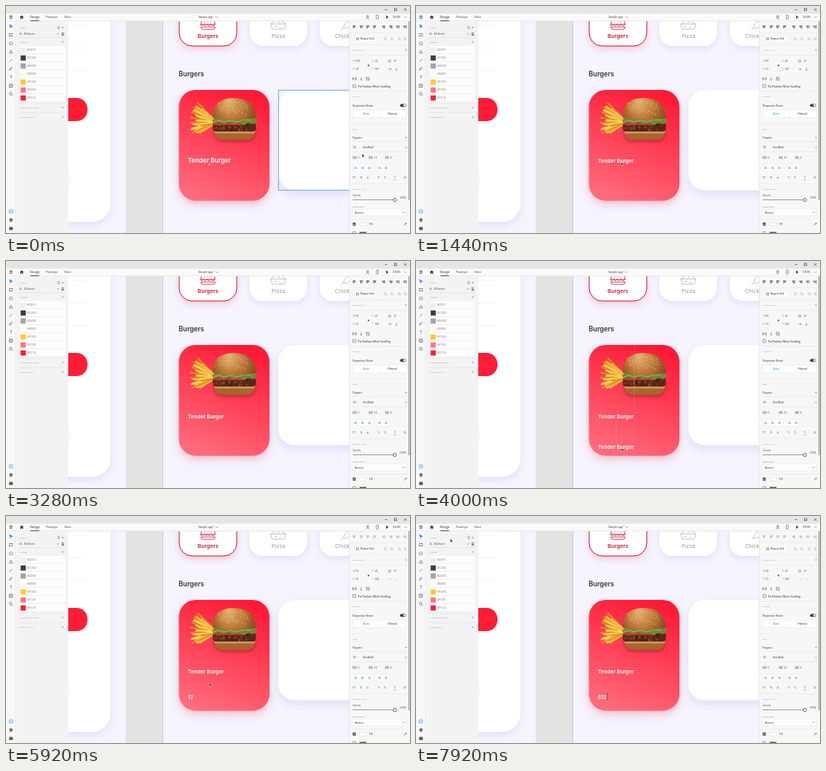
Recreate the animation shown at these times as an HTML page with a canvas. Size 506 by 284 pixels, loop 8000 ms.

```html
<!DOCTYPE html>
<html lang="en">
<head>
<meta charset="utf-8">
<title>Design app</title>
<style>
html, body { margin: 0; width: 100%; height: 100%; overflow: hidden; background: #e3e3e3; }
canvas { display: block; width: 506px; height: 284px; }
</style>
</head>
<body>
<canvas id="stage"></canvas>
<script>
const W = 506, H = 284, LOOP = 8000, STEP = 80;
const UI = 'Lato, "Open Sans", sans-serif', APP = 'Inter, sans-serif';
const INK = '#55585c', RED = '#ff1c36', WINE = '#c71f39', BLUE = '#2f8df5', DISH = 'Tender Burger';
const canvas = document.getElementById('stage');
const dpr = window.devicePixelRatio || 1;
canvas.width = W * dpr;
canvas.height = H * dpr;
const c = canvas.getContext('2d');

function rect(x, y, w, h, fill) {
  c.fillStyle = fill;
  c.fillRect(x, y, w, h);
}

function round(x, y, w, h, r, fill, stroke, lw = 0.6) {
  c.beginPath();
  c.roundRect(x, y, w, h, r);
  if (fill) { c.fillStyle = fill; c.fill(); }
  if (stroke) { c.lineWidth = lw; c.strokeStyle = stroke; c.stroke(); }
}

function shadowed(color, blur, dy, draw) {
  c.save();
  c.shadowColor = color;
  c.shadowBlur = blur * dpr;
  c.shadowOffsetY = dy * dpr;
  draw();
  c.restore();
}

function line(color, lw, ...p) {
  c.beginPath();
  for (let i = 0; i < p.length; i += 2) c.lineTo(p[i], p[i + 1]);
  c.lineWidth = lw;
  c.strokeStyle = color;
  c.stroke();
}

function path(d, stroke, lw = 0.6, fill) {
  const p = new Path2D(d);
  if (fill) { c.fillStyle = fill; c.fill(p); }
  if (stroke) { c.lineWidth = lw; c.strokeStyle = stroke; c.stroke(p); }
}

function circle(x, y, r, fill, stroke, lw = 0.6) {
  c.beginPath();
  c.arc(x, y, r, 0, 7);
  if (fill) { c.fillStyle = fill; c.fill(); }
  if (stroke) { c.lineWidth = lw; c.strokeStyle = stroke; c.stroke(); }
}

function text(s, x, y, size, color = INK, align = 'left', weight = 400, font = UI) {
  c.font = `${weight} ${size}px ${font}`;
  c.textAlign = align;
  c.fillStyle = color;
  c.fillText(s, x, y);
}

const label = (s, x, y) => text(s, x, y + 1, 2.5, '#8b8e92');
const chevron = (x, y) => line(INK, 0.6, x - 1.2, y - 0.6, x, y + 0.6, x + 1.2, y - 0.6);

function plus(x, y) {
  line('#85888c', 0.5, x - 1.2, y, x + 1.2, y);
  line('#85888c', 0.5, x, y - 1.2, x, y + 1.2);
}

function clipTo(x, y, w, h, draw) {
  c.save();
  c.beginPath();
  c.rect(x, y, w, h);
  c.clip();
  draw();
  c.restore();
}

function topBars() {
  rect(0, 0, W, 9.5, '#e6e6e6');
  rect(0, 9.5, W, 9.5, '#fafafa');
  rect(0, 18.6, W, 0.5, '#d9d9d9');
  line('#333', 0.6, 474.5, 4.5, 477.5, 4.5);
  c.lineWidth = 0.6;
  c.strokeRect(486.4, 3, 2.8, 2.8);
  path('M498.7 3l3 3m0-3l-3 3', '#333');
  for (let y = 12.3; y < 16; y += 1.5) line('#333', 0.7, 4.3, y, 8, y);
  path('M17.3 13.8L19.7 11.7L22.1 13.8H21.4V16.2H20.2V14.6H19.2V16.2H18V13.8Z', null, 0, '#333');
  text('Design', 36, 15.2, 3.8, '#222', 'center');
  rect(30.5, 18, 11, 0.8, '#333');
  text('Prototype', 57.3, 15.2, 3.5, INK, 'center');
  text('Share', 77.3, 15.2, 3.5, INK, 'center');
  text('Sample app *', 251, 15.2, 3.5, '#444', 'center');
  chevron(264, 14);
  circle(453, 13, 1.2, null, INK);
  path('M450.8 16.2q2.2-2.8 4.4 0', INK);
  round(463.8, 11.4, 2.6, 4.8, 0.5, null, INK);
  path('M476 11.6L479.3 13.9L476 16.2Z', null, 0, INK);
  text('150%', 489, 15.2, 3.9, '#444', 'center');
  chevron(500.5, 14);
}

function tools() {
  rect(0, 19, 12, 265, '#f8f8f8');
  rect(11.6, 19, 0.5, 265, '#e0e0e0');
  path('M4.5 23l4 2.6-2 .3-1 1.8z', BLUE, 0.5, BLUE);
  c.strokeStyle = INK;
  c.lineWidth = 0.6;
  c.strokeRect(4.2, 34.5, 3.8, 3.2);
  circle(6.2, 46.9, 2, null, INK);
  path('M6.2 55.2L8.4 59H4Z', INK);
  line(INK, 0.6, 4.3, 69.8, 8, 66.2);
  path('M4.3 80.2l.8-2.4 2-1.5 1 1-1.5 2zl1.5-1.5', INK, 0.5);
  text('T', 6.2, 90.8, 5, INK, 'center');
  path('M4 98H8.2V101.5H4ZM5 97V102.3M7.2 97V102.3', INK, 0.5);
  circle(5.8, 109.6, 1.7, null, INK);
  line(INK, 0.7, 7, 110.9, 8.3, 112.2);
  round(4.2, 255, 4, 4, 0.5, '#d9ebff', BLUE);
  path('M6.2 265.7L8.5 267L6.2 268.3L4 267ZM4 268.6L6.2 270L8.5 268.6', INK, 0.5, INK);
  path('M4.2 277h4v3h-4zM5.2 275.6v1.4m2-1.4v1.4', INK, 0.6, INK);
}

function assets() {
  rect(12, 19, 66, 265, '#f3f3f3');
  label('ASSETS', 17, 27);
  path('M65 25.7h2v2.6h-2z', INK, 0.4);
  path('M70 26l2 2m0-2l-2 2', INK, 0.4);
  circle(18.2, 34.6, 1, null, INK, 0.5);
  line(INK, 0.5, 18.9, 35.4, 19.7, 36.2);
  text('All Assets', 22.5, 36, 3.2);
  chevron(65.2, 35);
  for (let y = 33.4; y < 37; y += 1.4) rect(69.6, y, 3, 0.8, INK);
  rect(16, 39.6, 58, 0.4, '#d4d4d4');
  label('COLORS', 17, 45);
  plus(71, 45);
  const swatches = ['#eceef2', '#3c3d42', '#a3a3a3', '#fafafa', '#ffca28', '#ff7280', RED];
  swatches.forEach((s, i) => {
    const y = 50 + i * 10;
    rect(18, y, 56, 9.7, '#fdfdfd');
    rect(18, y + 9.6, 56, 0.4, '#e2e2e2');
    rect(18.3, y + 1.8, 6.5, 6.5, s);
    text(s.toUpperCase(), 26.2, y + 6, 2.7, '#888');
  });
  rect(16, 121.8, 58, 0.4, '#dcdcdc');
  label('CHARACTER STYLES', 17, 127);
  plus(71, 127);
  rect(16, 133, 58, 0.4, '#dcdcdc');
  label('COMPONENTS', 17, 139);
  plus(71, 139);
}

function firstBoard() {
  rect(78, 19, 72, 265, '#f5f4ff');
  shadowed('rgba(110,100,180,.13)', 10, 4, () => round(40, -10, 91, 280, 23, '#fff'));
  for (const y of [24.5, 52, 80]) rect(78, y, 23, 0.5, '#ececf0');
  round(50, 115, 52, 29, 13.5, RED);
  circle(65, 218, 15, null, '#e6e6ec', 0.6);
}

function menuIcons() {
  path('M244 23q0-7 9-7t9 7zM243 23q2.2 3 4.5 0q2.3 3 4.5 0q2.3 3 4.5 0q2.3 3 5.5 0M244 26.2h18q0 3-3 3h-12q-3 0-3-3zM248 20h1m3-1h1m3 1h1', WINE, 0.8);
  path('M332 22L341 16L350 22M331.5 22.5H350.5L348.5 29H333.5ZM336 25.5h3m3 1.5h3M340 20h3', '#a2a2a6', 0.6);
  path('M422.5 27.5q2-8 8-9v7q-4 4-8 2zm-.5.5l-2 1.6', '#a2a2a6', 0.6);
}

function randomizer(seed) {
  return () => (seed = (seed * 16807) % 2147483647) / 2147483647;
}

// Sticks fan out to the upper left from a point hidden behind the bun
function fries() {
  const rnd = randomizer(11), tones = ['#d98f1e', '#f3b838', '#f9cf62'];
  c.lineCap = 'round';
  for (let i = 0; i < 42; i++) {
    const a = 2.55 + (i * 0.618 % 1) * 1.4, reach = 19 + rnd() * 15, near = 3 + rnd() * 4;
    const dx = Math.cos(a), dy = Math.sin(a);
    line(tones[i % 3], 2, 264 + dx * near, 145 + dy * near, 264 + dx * reach, 145 + dy * reach);
  }
  c.lineCap = 'butt';
}

function burger() {
  const rnd = randomizer(5);
  shadowed('rgba(90,0,10,.4)', 5, 2, () => round(261, 152, 51, 15.5, [3, 3, 10, 10], '#a8652d'));
  const bun = c.createRadialGradient(279, 119, 2, 284, 128, 30);
  bun.addColorStop(0, '#e2ae6c');
  bun.addColorStop(0.5, '#c07a38');
  bun.addColorStop(1, '#854a20');
  round(261, 155, 51, 4.5, 2, '#cf9655');
  round(259, 146, 54, 11, 4, '#57291a');
  for (let i = 0; i < 40; i++)
    circle(261 + rnd() * 50, 147 + rnd() * 9, 0.6 + rnd(), ['#7c3b20', '#3d1c12', '#9d5028'][i % 3]);
  round(260, 144.5, 40, 4.5, 2, '#c2392a');
  path('M258 144q3-5 9-4l42-1q6 1 5 6l-5 3-5-2-6 3-6-3-7 2-6-3-7 3-6-3-5 2z', null, 0, '#71893a');
  path('M260 145l7-2 6 2 8-2 9 2 8-3 9 1', '#abb860', 0.9);
  path('M259 140q-1-24 25-25q28 0 29 25q-25 5-54 0z', null, 0, bun);
  for (let i = 0; i < 34; i++) {
    const x = 266 + (i * 17) % 38, y = 118.5 + (i * 7) % 15 + Math.abs(x - 285) * 0.18;
    c.beginPath();
    c.ellipse(x, y, 0.8, 0.5, i, 0, 7);
    c.fillStyle = '#ecd0a0';
    c.fill();
  }
}

function secondBoard() {
  rect(196.3, 19, 233.7, 265, '#f5f4ff');
  rect(196, 19, 0.6, 265, '#b9b9c2');
  shadowed('rgba(255,28,54,.2)', 8, 4, () => round(217, -20, 72, 70, 16, '#fff'));
  round(217, -20, 72, 70, 16, '#fff', WINE, 1);
  for (const x of [305, 393])
    shadowed('rgba(110,100,180,.14)', 9, 3, () => round(x, -20, 72, 70, 16, '#fff'));
  menuIcons();
  text('Burgers', 253, 39.5, 6.8, WINE, 'center', 600, APP);
  text('Pizza', 341.2, 39.5, 6.6, '#99999d', 'center', 400, APP);
  text('Chicken', 412, 39.5, 6.8, '#99999d', 'left', 400, APP);
  text('Burgers', 216.3, 88.3, 8.4, '#34343c', 'left', 600, APP);
  shadowed('rgba(110,100,180,.15)', 11, 5, () => round(341.3, 105.3, 114, 125.3, 20, '#fff'));
  const g = c.createLinearGradient(300, 108, 246, 244);
  g.addColorStop(0, '#ff1a35');
  g.addColorStop(1, '#ff6c7d');
  shadowed('rgba(255,50,74,.26)', 11, 5, () => round(216.5, 105, 113.5, 138.7, 21, g));
  fries();
  burger();
}

// Bar with two blocks, used by the align row
function alignIcon(x, y, vertical, color) {
  c.save();
  c.translate(x, y);
  if (vertical) c.rotate(Math.PI / 2);
  rect(-2, -2, 4, 0.6, color);
  rect(-1.3, -1, 1.1, 3, color);
  rect(0.4, -1, 1.1, 2, color);
  c.restore();
}

function paragraph(x, y, color, shift) {
  for (let i = 0; i < 3; i++) rect(x - 1.7 + (i % 2) * shift, y - 1.4 + i * 1.2, i % 2 ? 2.2 : 3.4, 0.5, color);
}

function inspector(v) {
  rect(430, 19, 76, 265, '#f7f7f7');
  rect(429.7, 19, 0.5, 265, '#d6d6d6');
  for (const y of [33, 48.5, 61, 106.5, 147, 222, 266]) rect(430, y, 73, 0.4, '#dedede');
  rect(504, 19, 1.6, 224, '#a9abae');

  const tone = v.dim ? '#b5b7ba' : '#54575b';
  [436, 445, 453, 461.5, 473, 482, 490.5, 499.5].forEach((x, i) => alignIcon(x, 26, i > 3, tone));
  round(436, 37, 29.5, 8, 4, '#fff', '#e3e3e3', 0.4);
  path('M438.7 39.5h1.2v1.2h-1.2zm2 0h1.2v1.2h-1.2zm-2 2h1.2v1.2h-1.2zm2 0h1.2v1.2h-1.2z', null, 0, INK);
  text('Repeat Grid', 444, 42.2, 3.3, '#333');
  for (const x of [475, 483, 492.5, 500]) {
    circle(x - 0.5, 40.5, 1.2, null, '#b6b8bb', 0.5);
    circle(x + 0.7, 41.7, 1.2, null, '#b6b8bb', 0.5);
  }
  label('COMPONENT', 434, 55);
  plus(501, 55);

  [['W', v.w, 434.5, 70.2], ['X', '45', 458.5, 70.2], ['H', v.h, 434.5, 80.2], ['Y', v.y, 458.5, 80.2]]
    .forEach(([k, n, x, y]) => {
      text(k, x, y, 2.9, '#999');
      text(n, x + 3.5, y, 3.1);
    });
  round(453, 73.6, 2, 1.6, 0.2, INK);
  circle(480.5, 69, 1.4, null, INK, 0.5);
  text('0°', 486, 70.2, 3.1);
  path('M479 79h3.4m-1-1l1 1-1 1', v.dim ? '#c0c2c4' : INK, 0.5);
  path('M489 77.3v3.4m-1-1l1 1 1-1', v.dim ? '#c0c2c4' : INK, 0.5);
  path('M434.3 89v4m4-4v4m-4-2h4', INK);
  path('M444.8 89v4m-1.2-1.2l1.2 1.2 1.2-1.2', INK, 0.5);
  path('M451.3 89.2h3.6v3.6h-3.6zm0 0l3.6 3.6', INK, 0.5);
  round(434.5, 98.3, 3.6, 3.6, 0.5, '#fff', INK);
  text('Fix Position When Scrolling', 440.8, 101.5, 3.4, '#333');

  label('LAYOUT', 434, 113);
  text('Responsive Resize', 434.3, 125.7, 3.2, '#444');
  round(493.5, 122.4, 7.6, 3.8, 1.9, '#424549');
  circle(499.2, 124.3, 1.4, '#fff');
  round(434, 130.2, 67.5, 9.4, 1, '#fff', '#e0e0e0', 0.4);
  rect(467.6, 130.2, 0.4, 9.4, '#e0e0e0');
  text('Auto', 451, 136.2, 3.6, BLUE, 'center');
  text('Manual', 484, 136.2, 3.6, '#444', 'center');

  label('TEXT', 434, 154);
  text('Poppins', 434.3, 165.5, 3.3, '#444');
  chevron(501, 164.5);
  rect(434, 169.5, 68, 0.4, '#d9d9d9');
  text(v.size, 434.5, 178.3, 3.3, '#444');
  text('SemiBold', 446.8, 178.3, 3.3, '#444');
  chevron(501, 177);
  rect(434, 182, 8, 0.4, '#d9d9d9');
  rect(446, 182, 56, 0.4, '#d9d9d9');
  [[434.8, '0'], [455, '15'], [475.5, '0']].forEach(([x, n]) => {
    path(`M${x} 187.5v4m3.4-4v4m-2.6-.5l.9-2.8.9 2.8`, INK, 0.5);
    text(n, x + 5.8, 191.2, 3.2);
  });
  round(434, 198.4, 25.5, 8, 0.7, '#fff', '#dce5ee', 0.4);
  round(464, 198.4, 16, 8, 0.7, '#fff', '#dce5ee', 0.4);
  [438, 446.5, 455, 468, 476].forEach((x, i) => paragraph(x, 202.3, i ? '#6f8196' : BLUE, [0, 0.6, 1.2][i % 3]));
  [['TT', 436], ['Tt', 444.7], ['tt', 453], ['T¹', 467], ['T₁', 475], ['T', 487], ['T', 499.5]]
    .forEach(([s, x]) => text(s, x, 216.2, 3.2, INK, 'center'));
  rect(485.6, 217, 2.8, 0.4, INK);
  rect(498, 214.8, 3, 0.4, INK);

  label('APPEARANCE', 434, 229);
  text('Opacity', 434.3, 238, 2.9, '#666');
  rect(434, 242.3, 53, 0.7, '#7b7e82');
  circle(487, 242.6, 2, '#fff', '#44474b', 0.8);
  text('100%', 493, 241, 3.2);
  text('Blend Mode', 434.3, 251.7, 2.6, '#777');
  round(434, 254, 67.5, 8.6, 0.8, '#fff', '#dfdfdf', 0.4);
  text('Normal', 436.8, 259.5, 3.3, '#444');
  chevron(498, 258.3);
  round(434.3, 271, 3.8, 3.8, 0.6, '#4a4d51');
  line('#fff', 0.6, 435.1, 272.9, 436, 273.8, 437.4, 272);
  round(442.8, 270.8, 8.6, 4.2, 0.4, '#fff', '#ccc', 0.4);
  text('Fill', 455, 274, 3.3, '#444');
  path('M498.5 274.4l2-2m-.4-1l1.6 1.6m-.8-.8l.8-.9', INK, 0.8);
  round(434.3, 282.3, 3.8, 3.8, 0.6, null, '#66696d');
  rect(442.8, 282.6, 8.6, 2, '#55585c');
}

const smooth = k => k * k * (3 - 2 * k);

// Keys are [time, ...values], eased between neighbours
function track(keys, t) {
  const i = keys.findIndex(k => k[0] > t);
  if (i < 0) return keys[keys.length - 1].slice(1);
  if (i === 0) return keys[0].slice(1);
  const a = keys[i - 1], b = keys[i], k = smooth((t - a[0]) / (b[0] - a[0]));
  return a.slice(1).map((n, j) => n + (b[j + 1] - n) * k);
}

const COPY = 3520, EDIT = 4480, LEAVE = 5440;
const pointerKeys = [
  [480, 446, 185], [1120, 256.5, 195.5], [1440, 256.5, 195.5], [2400, 256.5, 196.5],
  [COPY, 256.5, 196.5], [3920, 257.5, 234], [4080, 257.5, 234], [4320, 256.5, 228],
  [LEAVE, 256.5, 228], [5760, 254.5, 209], [7120, 254.5, 209], [7760, 43, 28.5]
];
const dishKeys = [[1440, 195.6], [2400, 196.6]];
const copyKeys = [[COPY, 196.6], [3920, 234.8], [4080, 234.8], [4320, 228.6]];
const typed = [
  [EDIT, DISH], [5280, '1'], [5440, '12'], [6320, '1'],
  [6400, ''], [6640, '$'], [6800, '$1'], [6960, '$12']
];

function pointer(x, y) {
  c.save();
  c.translate(x, y);
  path('M0 0V4.2L1 3.3L1.7 4.8L2.4 4.5L1.8 3.1H3Z', '#fff', 0.4, '#111');
  c.restore();
}

const dishText = (s, y, size = 6.55) => text(s, 227.7, y, size, '#fff', 'left', 600, APP);

function copyText(base, t) {
  const [since, s] = typed.findLast(k => k[0] <= t) || typed[0];
  if (t >= EDIT && s === DISH) rect(227.7, 214.3, 46, 16.2, BLUE);
  dishText(s, base);
  if (s !== DISH && (t - since) % 960 < 480)
    rect(228.2 + c.measureText(s).width, 221, 0.6, 10, '#4d4f5c');
  return s;
}

function draw(t) {
  c.setTransform(dpr, 0, 0, dpr, 0, 0);
  const [px, py] = track(pointerKeys, t);
  const [dishY] = track(dishKeys, t), [copyY] = track(copyKeys, t);
  const big = t < 400;
  let s = DISH;
  rect(0, 0, W, H, '#e3e3e3');
  clipTo(78, 19, 72, 265, firstBoard);
  clipTo(196, 19, 234, 265, () => {
    secondBoard();
    if (px > 341) {
      c.strokeStyle = '#5b9fdc';
      c.lineWidth = 0.8;
      c.strokeRect(341.3, 105.3, 114, 125.3);
    }
    dishText(DISH, dishY, big ? 7.85 : 6.55);
    if (t < 1040) circle(254.8, 198.2, 0.9, '#fff', '#8bbcf0', 0.3);
    const copying = t >= COPY && t < 4400;
    if (copying || (t >= 1840 && t < 2640)) rect(273, 105, 0.6, 138.5, 'rgba(235,120,155,.7)');
    if (copying) rect(250, dishY, 0.5, Math.max(0, copyY - dishY - 2), 'rgba(255,150,175,.75)');
    if (t >= COPY) s = copyText(copyY, t);
  });
  topBars();
  tools();
  assets();
  inspector({
    dim: t >= EDIT,
    size: big ? '12' : '10',
    w: s === DISH ? (big ? '119' : '99') : 8 * s.length,
    h: big ? '18' : '15',
    y: Math.round(547 + ((t < COPY ? dishY : copyY) - 195.6) * 2.2)
  });
  if (t < EDIT || t >= LEAVE) pointer(px, py);
}

let last = -1;
function tick(now) {
  const t = Math.floor((now % LOOP) / STEP) * STEP;
  if (t !== last) draw(last = t);
  requestAnimationFrame(tick);
}
draw(0);
requestAnimationFrame(tick);
</script>
</body>
</html>
```
